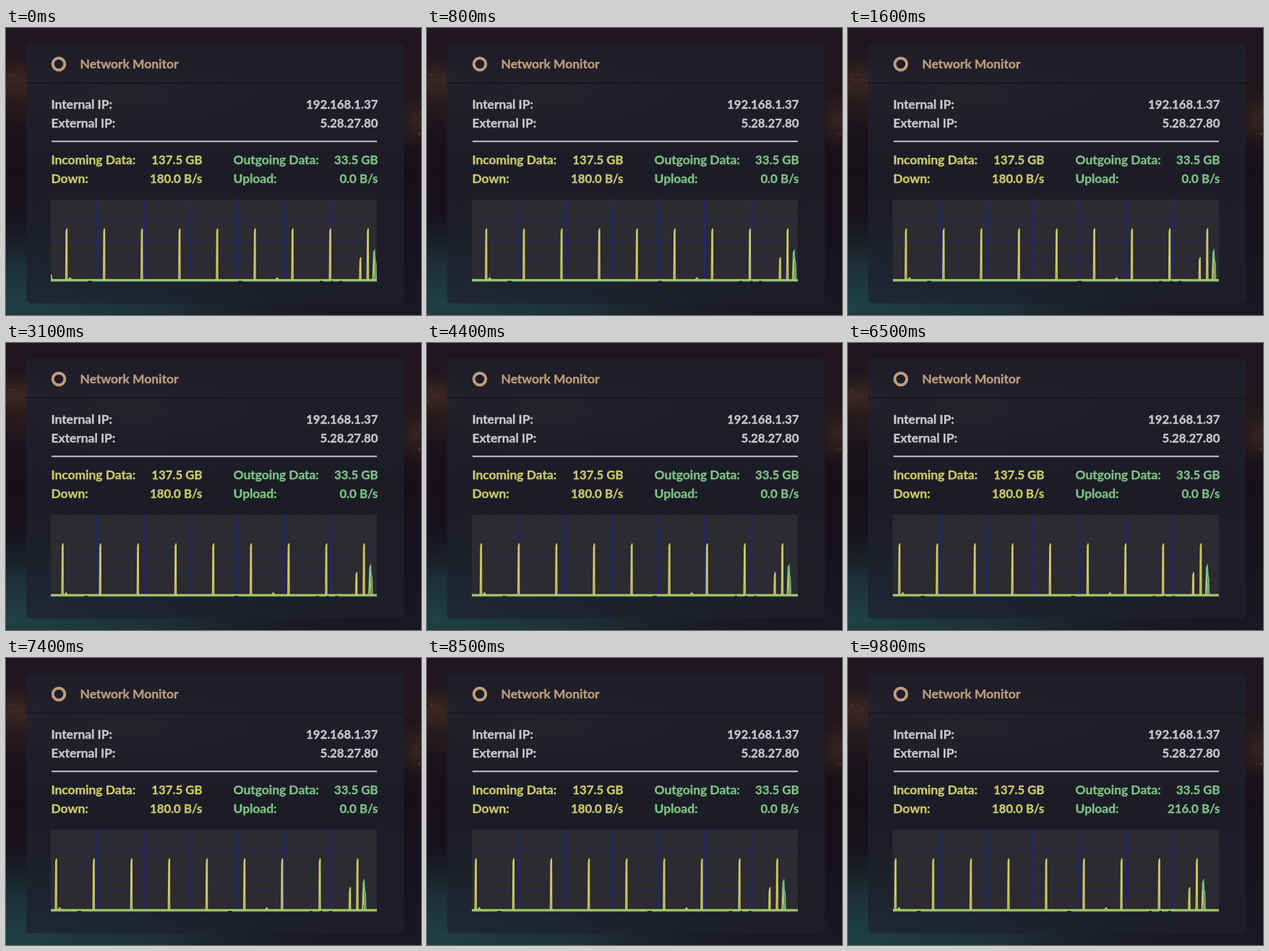
These frames come from a looping animation (574x398 px, 10000 ms). An HTML page:

```html
<!DOCTYPE html>
<html lang="en">
<head>
<meta charset="utf-8">
<title>Network Monitor</title>
<style>
  html, body { margin: 0; width: 100%; height: 100%; overflow: hidden; background: #1a121b; }
  svg { display: block; }
  text { font: 700 17.4px Lato, sans-serif; fill: currentColor; stroke: currentColor; stroke-width: .35px; }
  .end { font-size: 16.8px; text-anchor: end; }
  .title { color: #bd9d7c; }
  .ip { color: #c9c8cb; }
  .in { color: #cacb69; }
  .out { color: #7cc283; }
</style>
</head>
<body>
<svg width="574" height="398" viewBox="0 0 574 398">
  <defs>
    <linearGradient id="sky" x2="0" y2="1">
      <stop offset="0" stop-color="#1f1520"/>
      <stop offset=".2" stop-color="#20161c"/>
      <stop offset=".5" stop-color="#171019"/>
      <stop offset=".75" stop-color="#17131d"/>
      <stop offset="1" stop-color="#1b1722"/>
    </linearGradient>
    <radialGradient id="water" gradientUnits="userSpaceOnUse" cx="0" cy="0" r="1"
        gradientTransform="translate(0 385) scale(480 130)">
      <stop offset="0" stop-color="#1f4145"/>
      <stop offset=".45" stop-color="#1d363d" stop-opacity=".8"/>
      <stop offset="1" stop-color="#1a2028" stop-opacity="0"/>
    </radialGradient>
    <radialGradient id="glow">
      <stop offset="0" stop-color="#5a3a26" stop-opacity=".4"/>
      <stop offset="1" stop-color="#5a3a26" stop-opacity="0"/>
    </radialGradient>
    <clipPath id="plot"><rect x="62" y="238" width="451" height="114"/></clipPath>
  </defs>

  <rect width="574" height="398" fill="url(#sky)"/>
  <ellipse cx="10" cy="72" rx="60" ry="34" fill="url(#glow)"/>
  <ellipse cx="170" cy="95" rx="230" ry="60" fill="url(#glow)"/>
  <ellipse cx="566" cy="128" rx="30" ry="40" fill="url(#glow)"/>
  <rect width="574" height="398" fill="url(#water)"/>
  <g id="lights" fill="#8a5530"/>

  <rect x="28" y="21" width="522" height="361" rx="6" fill="#1e212d" fill-opacity=".74"/>
  <path d="M28 76.5H550" stroke="#14131b" stroke-width="1.5"/>

  <circle cx="73" cy="50" r="8.3" fill="none" stroke="#bd9d7c" stroke-width="4"/>
  <text class="title" x="102.5" y="56">Network Monitor</text>
  <g class="ip">
    <text x="62.5" y="112">Internal IP:</text><text class="end" x="514.5" y="112">192.168.1.37</text>
    <text x="62.5" y="138">External IP:</text><text class="end" x="514.5" y="138">5.28.27.80</text>
  </g>
  <path d="M63 157.2H513" stroke="#c4c3c7" stroke-width="2"/>
  <g class="in">
    <text x="62.5" y="188.5">Incoming Data:</text><text class="end" x="271.5" y="188.5">137.5 GB</text>
    <text x="62.5" y="214.5">Down:</text><text class="end" x="271.5" y="214.5">180.0 B/s</text>
  </g>
  <g class="out">
    <text x="314.5" y="188.5">Outgoing Data:</text><text class="end" x="514.5" y="188.5">33.5 GB</text>
    <text x="314.5" y="214.5">Upload:</text><text class="end" id="upload" x="514.5" y="214.5">0.0 B/s</text>
  </g>

  <g clip-path="url(#plot)" fill="none">
    <rect x="62" y="238" width="451" height="114" fill="#2c2b2f"/>
    <path d="M62 266.5H513M62 294.5H513M62 322.5H513" stroke="#28274a" stroke-width="2.6"/>
    <path d="M127 238V352M191.4 238V352M255.8 238V352M320.2 238V352M384.6 238V352M449 238V352"
      stroke="#272663" stroke-width="3.4"/>
    <path d="M62 350.4H513" stroke="#80c878" stroke-width="2.2"/>
    <path d="M62 349H513" stroke="#c9d066" stroke-width="1.6"/>
    <g id="trace">
      <path d="M507.4 349L508.6 311L509.6 309L510.4 322L511.4 326L512 349" stroke="#70c088" stroke-width="1.8"/>
      <path d="M507.6 349L509 320L510 349" stroke="#c9c866" stroke-width="1.4"/>
      <path d="M113 351.4H119M321 351.4H327M434 351.4H438M449 351.4H452M461 351.4H465" stroke="#17171a" stroke-width="1.5"/>
      <path id="spikes" stroke="#c9ca68" stroke-width="1.6"/>
    </g>
  </g>
</svg>
<script>
const LOOP = 10000, STEP = 1.8;
const el = id => document.getElementById(id);

let seed = 7;
const random = (lo, hi) => {
  seed = (seed * 16807) % 2147483647;
  return lo + (hi - lo) * seed / 2147483647;
};

// Faint warm specks beside the panel.
let specks = '';
for (let i = 0; i < 44; i++) {
  const left = i % 2;
  const x = left ? random(0, 28) : random(552, 574);
  const y = left ? random(55, 88) : random(90, 155);
  specks += `<circle cx="${x}" cy="${y}" r="${random(.5, 1.5)}" opacity="${random(.1, .35)}"/>`;
}
el('lights').innerHTML = specks;

const spike = (x, top) => `M${x - 1} 349L${x - .4} ${top + 5}L${x + .7} ${top + 1}L${x + .9} 349`;
const bump = x => `M${x - 2} 349L${x} 346.5L${x + 2} 349`;
let path = 'M62.5 342L63.5 349' + bump(88.5) + bump(375) + spike(490, 317);
for (let i = 0; i < 9; i++) path += spike(83.6 + i * 52.1, 277);
el('spikes').setAttribute('d', path);

function draw() {
  const t = performance.now() % LOOP;
  const samples = Math.floor((t + 700) / 1000);
  el('trace').setAttribute('transform', `translate(${-samples * STEP})`);
  el('upload').textContent = samples < 10 ? '0.0 B/s' : '216.0 B/s';
  requestAnimationFrame(draw);
}
draw();
</script>
</body>
</html>
```
